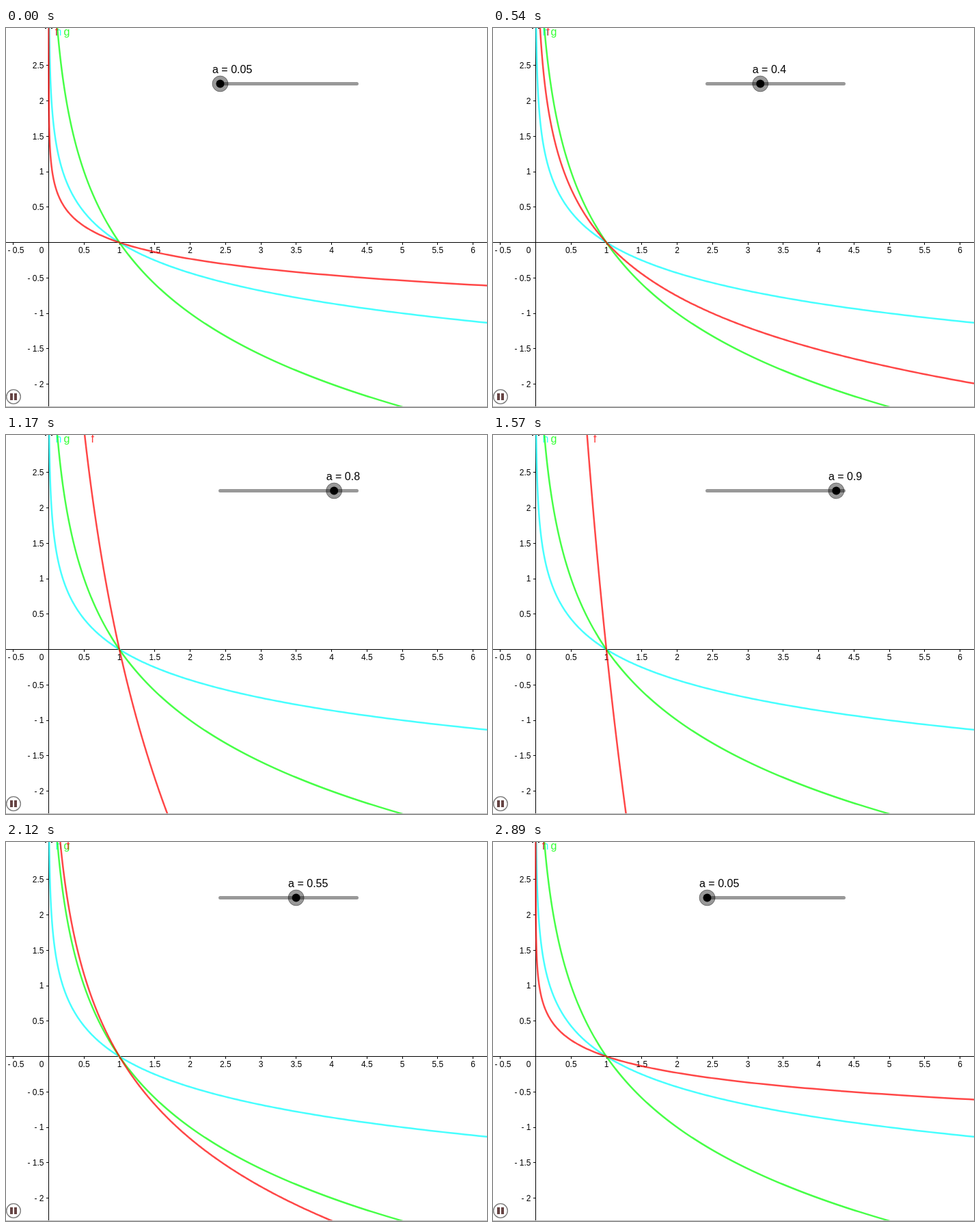
An HTML page for the animation above (2970 ms loop, 704x554 px).

```html
<!DOCTYPE html>
<html lang="en">
<head>
<meta charset="utf-8">
<title>Logarithm with a changing base</title>
<style>
  html, body { margin: 0; width: 100%; height: 100%; overflow: hidden; background: #fff; }
  svg { display: block; width: 704px; height: 554px; }
  text { font-family: "Liberation Sans", Arial, sans-serif; font-size: 16px; }
  #axes text { font-size: 12px; }
  .curve { fill: none; stroke-width: 2.5; stroke-opacity: .72; stroke-linejoin: round; }
</style>
</head>
<body>
<svg id="stage" viewBox="0 0 704 554">
  <g id="axes">
    <path d="M0 313.5H704M62.5 0V554M57.5 1L62.5 -4L67.5 1" fill="none" stroke="#000" shape-rendering="crispEdges"/>
  </g>
  <g id="curves"></g>
  <path d="M313.5 81.5H513.5" stroke="#000" stroke-opacity=".4" stroke-width="5" stroke-linecap="round"/>
  <g id="knob">
    <circle r="11.5" cy="81.5" fill="#000" fill-opacity=".4" stroke="#000" stroke-opacity=".4"/>
    <circle r="6" cy="81.5"/>
    <text id="value" x="-11.5" y="66"></text>
  </g>
  <path d="M0 553.5H704" stroke="#bbb"/>
  <circle cx="11" cy="539" r="10.3" fill="#fff" stroke="#777" stroke-width="1.3"/>
  <path d="M6 534h4v10h-4zM12 534h4v10h-4z" fill="#644"/>
</svg>
<script>
const UNIT = 103.5, ORIGIN_X = 62.5, ORIGIN_Y = 313.5;
const TOP = ORIGIN_Y / UNIT, RIGHT = 6.3;
const LOOP = 2970, STEPS = 38, PEAK = 18;
const SHORT_STEPS = [3, 6, 9, 16, 20, 29, 35, 36], LONG_STEP = 19;

const byId = id => document.getElementById(id);
const px = x => ORIGIN_X + x * UNIT;
const py = y => ORIGIN_Y - y * UNIT;

function add(parent, tag, attributes, content = "") {
  const node = document.createElementNS("http://www.w3.org/2000/svg", tag);
  for (const name in attributes) node.setAttribute(name, attributes[name]);
  node.textContent = content;
  parent.append(node);
  return node;
}

function drawAxes() {
  const axes = byId("axes");
  const label = n => n < 0 ? "- " + -n : String(n);
  const tick = d => add(axes, "path", { d, stroke: "#000", "shape-rendering": "crispEdges" });
  const write = (n, x, y, anchor) => add(axes, "text", { x, y, "text-anchor": anchor }, label(n));
  for (let n = -0.5; n <= 6; n += 0.5) {
    if (n === 0) continue;
    tick(`M${Math.floor(px(n)) + .5} 314v3`);
    if (n < 0) write(n, 2.5, 329, "start");
    else write(n, px(n), 329, "middle");
  }
  for (let n = -2; n <= 2.5; n += 0.5) {
    if (n === 0) continue;
    tick(`M59 ${Math.floor(py(n)) + .5}h3`);
    write(n, 55.5, py(n) + 4.3, "end");
  }
  write(0, 55.5, 329, "end");
}

function makeCurve(name, color) {
  const path = add(byId("curves"), "path", { class: "curve", stroke: color });
  const label = add(byId("curves"), "text", { y: 11, fill: color, "fill-opacity": .8 }, name);
  return base => {
    const logBase = Math.log(base), from = (TOP + .1) * logBase, to = Math.log(RIGHT);
    const points = [];
    for (let i = 0; i <= 400; i++) {
      const u = from + (to - from) * i / 400;
      points.push(px(Math.exp(u)).toFixed(2) + " " + py(u / logBase).toFixed(2));
    }
    path.setAttribute("d", "M" + points.join("L"));
    label.setAttribute("x", px(base ** TOP) + 9.3);
  };
}

function stepAt(time) {
  let end = 0;
  for (let step = 0; step < STEPS; step++) {
    end += SHORT_STEPS.includes(step) ? 70 : step === LONG_STEP ? 90 : 80;
    if (time < end) return step;
  }
  return STEPS - 1;
}

drawAxes();
makeCurve("h", "#0ff")(0.2);
makeCurve("g", "#0f0")(0.5);
const setRed = makeCurve("f", "#f00");
let shown = -1;

function render(time) {
  const step = stepAt(time % LOOP);
  if (step === shown) return;
  shown = step;
  const rise = step <= PEAK ? step : STEPS - 1 - step;
  const base = +(0.05 * (rise + 1)).toFixed(2);
  setRed(base);
  byId("knob").setAttribute("transform", `translate(${313.5 + rise / PEAK * 200} 0)`);
  byId("value").textContent = "a = " + base;
}

const start = performance.now();
function frame() {
  render(performance.now() - start);
  requestAnimationFrame(frame);
}
frame();
</script>
</body>
</html>
```
